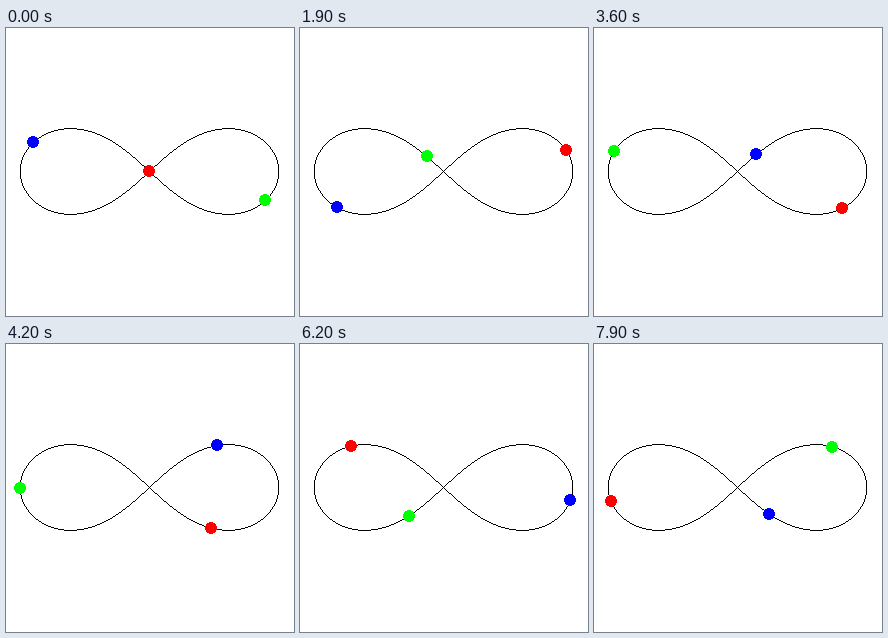
A matplotlib script for the animation above (8000 ms loop, 288 by 288 pixels).

```python
import numpy as np
import matplotlib.pyplot as plt
from matplotlib.animation import FuncAnimation

SIZE = 288
CENTER = 143.5
SCALE = 287 / 2.4          # world range -1.2 .. 1.2
RADIUS = 0.02 * SIZE
COLORS = (255, 0, 0), (0, 255, 0), (0, 0, 255)

PERIOD = 6.32591398        # figure-eight three-body orbit
STEPS = 100                # animation steps per orbit
SUBSTEPS = 20
FRAMES = 80


def accel(pos):
    gap = pos[None] - pos[:, None]
    dist = np.sqrt((gap ** 2).sum(-1)) + np.eye(3)
    return (gap / dist[..., None] ** 3).sum(1)


def deriv(state):
    return np.array([state[1], accel(state[0])])


def rk4(state, h):
    k1 = deriv(state)
    k2 = deriv(state + h / 2 * k1)
    k3 = deriv(state + h / 2 * k2)
    k4 = deriv(state + h * k3)
    return state + h / 6 * (k1 + 2 * k2 + 2 * k3 + k4)


def solve():
    p = np.array([0.97000436, -0.24308753])
    v = np.array([0.93240737, 0.86473146])
    state = np.array([[0 * p, p, -p], [v, -v / 2, -v / 2]])
    track = [state[0]]
    for _ in range(STEPS * SUBSTEPS):
        state = rk4(state, PERIOD / (STEPS * SUBSTEPS))
        track.append(state[0])
    return np.array(track)


def to_stage(pos):
    return CENTER + SCALE * pos * [1, -1]


def draw_curve(canvas, points):
    """Hairline: one pixel per step along the steeper axis."""
    t = np.arange(len(points))
    fine = np.linspace(0, t[-1], 40 * len(points))
    xy = np.column_stack([np.interp(fine, t, points[:, k]) for k in (0, 1)])
    move = np.abs(np.diff(xy, axis=0))
    mid = (xy[1:] + xy[:-1]) / 2
    for axis in (0, 1):
        crossed = np.diff(np.floor(xy[:, axis] - 0.5)) != 0
        major = move[:, axis] >= move[:, 1 - axis]
        col, row = np.floor(mid[crossed & major]).astype(int).T
        canvas[row, col] = 0


def draw_disc(canvas, pos, color):
    """Crisp disc, placed on whole pixels."""
    cx, cy = np.floor(pos - RADIUS) + np.ceil(RADIUS)
    y, x = np.mgrid[:SIZE, :SIZE] + 0.5
    canvas[np.hypot(x - cx, y - cy) < RADIUS] = color


track = to_stage(solve())
base = np.full((SIZE, SIZE, 3), 255, np.uint8)
draw_curve(base, track[:, 0])

fig = plt.figure(figsize=(SIZE / 72, SIZE / 72), dpi=72, facecolor="white")
ax = fig.add_axes([0, 0, 1, 1])
ax.axis("off")
stage = ax.imshow(base, interpolation="nearest")


def update(i):
    canvas = base.copy()
    for pos, color in zip(track[i * SUBSTEPS], COLORS):
        draw_disc(canvas, pos, color)
    stage.set_data(canvas)
    return [stage]


anim = FuncAnimation(fig, update, frames=FRAMES, interval=100,
                     repeat=True, repeat_delay=0)
plt.show()
```
